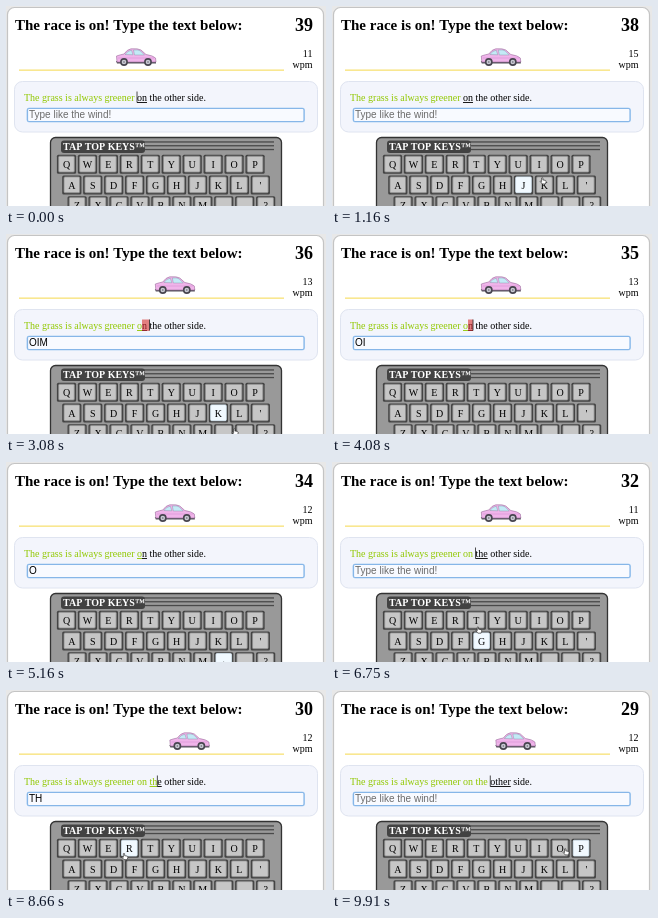
These frames come from a looping animation (320 px wide and 200 px high, 9.99 s). An HTML page with a canvas:

```html
<!DOCTYPE html>
<html lang="en">
<head>
<meta charset="utf-8">
<title>Typing race</title>
<style>
html, body { margin: 0; width: 100%; height: 100%; overflow: hidden; background: #fff; }
canvas { display: block; width: 320px; height: 200px; }
</style>
</head>
<body>
<canvas id="stage"></canvas>
<script>
const LOOP = 9990, TICK = 993, FIRST_TICK = 570;
const SERIF = '"Liberation Serif", "Times New Roman", serif';
const SANS = '"Liberation Sans", Arial, sans-serif';
const SENTENCE = 'The grass is always greener on the other side.';
const GREEN = '#91c800', RED = '#8b2024';

const canvas = document.getElementById('stage');
const ctx = canvas.getContext('2d');
const dpr = window.devicePixelRatio || 1;
canvas.width = 320 * dpr;
canvas.height = 200 * dpr;

const keys = ['QWERTYUIOP', 'ASDFGHJKL\'', 'ZXCVBNM,.?'].flatMap((row, r) =>
  [...row].map((label, i) => ({ label, x: 60.5 + r * 5.3 + i * 20.95, y: 149 + r * 20.7 })));
keys.push({ label: ' ', x: 150, y: 206 }, { label: '<', x: 250, y: 206 });

// Keys the pointer reaches, with arrival times; lower case and ',' are only passed over.
const visits = Object.entries({
  1400: 'O', 2000: 'I', 2800: 'M', 2980: 'k', 3400: '<', 4660: '<', 5080: ',', 5750: 'N',
  6540: ' ', 6670: 'g', 6850: 'T', 7500: 'y', 7830: 'H', 8900: 'E', 9520: ' ', 9830: 'p', 9990: 'o'
}).map(([time, char]) => ({
  time: +time, char, key: keys.find(k => k.label === char.toUpperCase())
}));

function typedAt(t) {
  let start = SENTENCE.indexOf('on '), input = '';
  for (const { time, char } of visits) {
    if (time > t) break;
    if (char === '<') input = input.slice(0, -1);
    else if (char === ' ') { start += input.length + 1; input = ''; }
    else if (/[A-Z]/.test(char)) input += char;
  }
  return { start, input };
}

function mouseAt(t) {
  let from = keys.find(k => k.label === ' '), left = 0;
  for (const { time, key } of visits) {
    if (t < time) {
      const begin = Math.max(left, time - 500);
      const u = Math.max(0, (t - begin) / (time - begin));
      const ease = 1 - (1 - u) ** 2;
      return [from.x + (key.x - from.x) * ease, from.y + 9.5 + (key.y - from.y) * ease];
    }
    from = key;
    left = time;
  }
  return [from.x, from.y + 9.5];
}

// Speed and car only learn the number of finished characters on a tick.
const tickTime = k => FIRST_TICK + (k - 1) * TICK;
const charsAt = k => k > 0 ? typedAt(tickTime(k)).start : SENTENCE.indexOf('greener');

function carX(t, k) {
  const before = charsAt(k - 1), now = charsAt(k);
  const part = t - tickTime(k) < 310 ? 0.55 : 1;
  return 13 + 4.85 * (before + (now - before) * part);
}

function text(str, x, y, font, color, align = 'left') {
  ctx.font = font;
  ctx.fillStyle = color;
  ctx.textAlign = align;
  ctx.fillText(str, x, y);
}

function rect(x, y, w, h, color) {
  ctx.fillStyle = color;
  ctx.fillRect(x, y, w, h);
}

function box(x, y, w, h, r, fill, stroke, line = 1) {
  ctx.beginPath();
  ctx.roundRect(x, y, w, h, r);
  ctx.fillStyle = fill;
  ctx.fill();
  if (!stroke) return;
  ctx.strokeStyle = stroke;
  ctx.lineWidth = line;
  ctx.stroke();
}

function shape(d, fill, stroke, line = 0.7) {
  const p = new Path2D(d);
  if (fill) { ctx.fillStyle = fill; ctx.fill(p); }
  if (stroke) { ctx.strokeStyle = stroke; ctx.lineWidth = line; ctx.stroke(p); }
}

function drawCar(x) {
  ctx.save();
  ctx.translate(x, 42);
  shape('M0 13 H40 V15.5 H1 Z', '#55525c');
  shape('M.5 8 Q5 6.5 8 6 Q11 1.5 15 .8 Q22 .2 25 2 L30 6.5 Q37 7.5 39.5 10 L40 14 H1 Z', '#f0b4ea', '#9b6c9c', 0.6);
  shape('M9 6.5 Q12 2.6 15.5 2.2 L17 6.8 Z M17.5 2 Q22 1.5 24.3 2.8 L28.5 7 H18.5 Z', '#c3eaf6', '#7f8a9c', 0.4);
  shape('M2 10 H38', null, '#d48fd0', 0.6);
  for (const wx of [8, 32]) {
    for (const [r, color] of [[3.9, '#47454f'], [2.3, '#c9cad4'], [0.8, '#65636d']]) {
      ctx.beginPath();
      ctx.arc(wx, 14, r, 0, 7);
      ctx.fillStyle = color;
      ctx.fill();
    }
  }
  ctx.restore();
}

function drawSentence({ start, input }, t) {
  const font = '10px ' + SERIF;
  ctx.font = font;
  const at = i => 18 + ctx.measureText(SENTENCE.slice(0, i)).width;
  const end = SENTENCE.indexOf(' ', start);
  const word = SENTENCE.slice(start, end).toUpperCase();
  let good = 0;
  while (good < input.length && input[good] === word[good]) good++;
  const mark = start + good, stop = start + input.length;

  rect(at(mark), 85.5, at(stop) - at(mark), 11.5, '#e27f80');
  for (const [a, b, color] of [[0, mark, GREEN], [mark, stop, RED], [stop, SENTENCE.length, '#000']]) {
    text(SENTENCE.slice(a, b), at(a), 95, font, color);
    const u0 = Math.max(a, start), u1 = Math.min(b, end);
    if (u1 > u0) rect(at(u0), 96.1, at(u1) - at(u0), 0.9, color);
  }
  if ((t + 345) % 1000 < 500) rect(at(stop) - 0.4, 85.5, 0.8, 11, '#222');
}

function drawInput(input) {
  box(20.5, 101.5, 278.5, 15, 3, '#b9d8f6');
  box(21.5, 102.5, 276.5, 13, 1.5, '#f8faff', '#86b6e8', 1.2);
  text(input || 'Type like the wind!', 23, 112.3, '10px ' + SANS, input ? '#000' : '#6b6b6b');
}

function drawKeyboard(t) {
  box(44.5, 131.5, 231, 90, 5, '#999', '#333', 1.3);
  for (let i = 0; i < 3; i++) rect(138, 135.3 + i * 3.8, 130, 1.3, '#4a4a4a');
  box(55, 134.5, 84, 12.5, 3, '#424242');
  text('TAP TOP KEYS™', 57, 144.4, 'bold 10px ' + SERIF, '#fff');
  const [mx, my] = mouseAt(t - 80);
  for (const { label, x, y } of keys) {
    const lit = Math.abs(mx - x) < 9.5 && my >= y && my < y + 19;
    box(x - 9.6, y - 0.2, 19.2, 19, 1.5, '#444');
    box(x - 7.8, y + 1.2, 15.6, 15.8, 1, lit ? '#f1f9ff' : '#c6c6c6', lit ? '#dcecf8' : '#8e8e8e', 0.8);
    text(label, x, y + 13, '10px ' + SERIF, '#000', 'center');
  }
}

function drawMouse(x, y) {
  ctx.save();
  ctx.translate(x, y);
  ctx.scale(0.8, 0.8);
  shape('M-.8 .5 Q0 -.5 .8 .5 V3 L4 3.6 Q5 4 4.8 5.5 L4 8 H0 L-2.6 4.8 Q-2.5 3.6 -.8 5 Z', '#fff', '#222', 0.8);
  ctx.restore();
}

function draw(t) {
  const k = Math.max(0, Math.floor((t - FIRST_TICK) / TICK) + 1);
  const typed = typedAt(t);
  const wpm = Math.floor(charsAt(k) / 5 * 60 / (21.06 + k * TICK / 1000));
  ctx.setTransform(dpr, 0, 0, dpr, 0, 0);
  rect(0, 0, 320, 200, '#e8e8e8');
  box(1.5, 1.5, 316, 230, 7, '#fff', '#c4c4c4', 1.2);

  text('The race is on! Type the text below:', 9, 24, 'bold 15px ' + SERIF, '#000');
  text(39 - k, 307, 25, 'bold 18px ' + SERIF, '#000', 'right');
  text(wpm, 306.5, 50.5, '10px ' + SERIF, '#000', 'right');
  text('wpm', 306.5, 62, '10px ' + SERIF, '#000', 'right');

  rect(13, 63.5, 265, 1.3, '#f8e276');
  drawCar(carX(t, k));

  box(8.5, 75.5, 303, 50.5, 8, '#f3f5fc', '#dfe4f0');
  drawSentence(typed, t);
  drawInput(typed.input);
  drawKeyboard(t);
  drawMouse(...mouseAt(t));
}

const begin = performance.now();
function frame() {
  draw((performance.now() - begin) % LOOP);
  requestAnimationFrame(frame);
}
frame();
</script>
</body>
</html>
```
